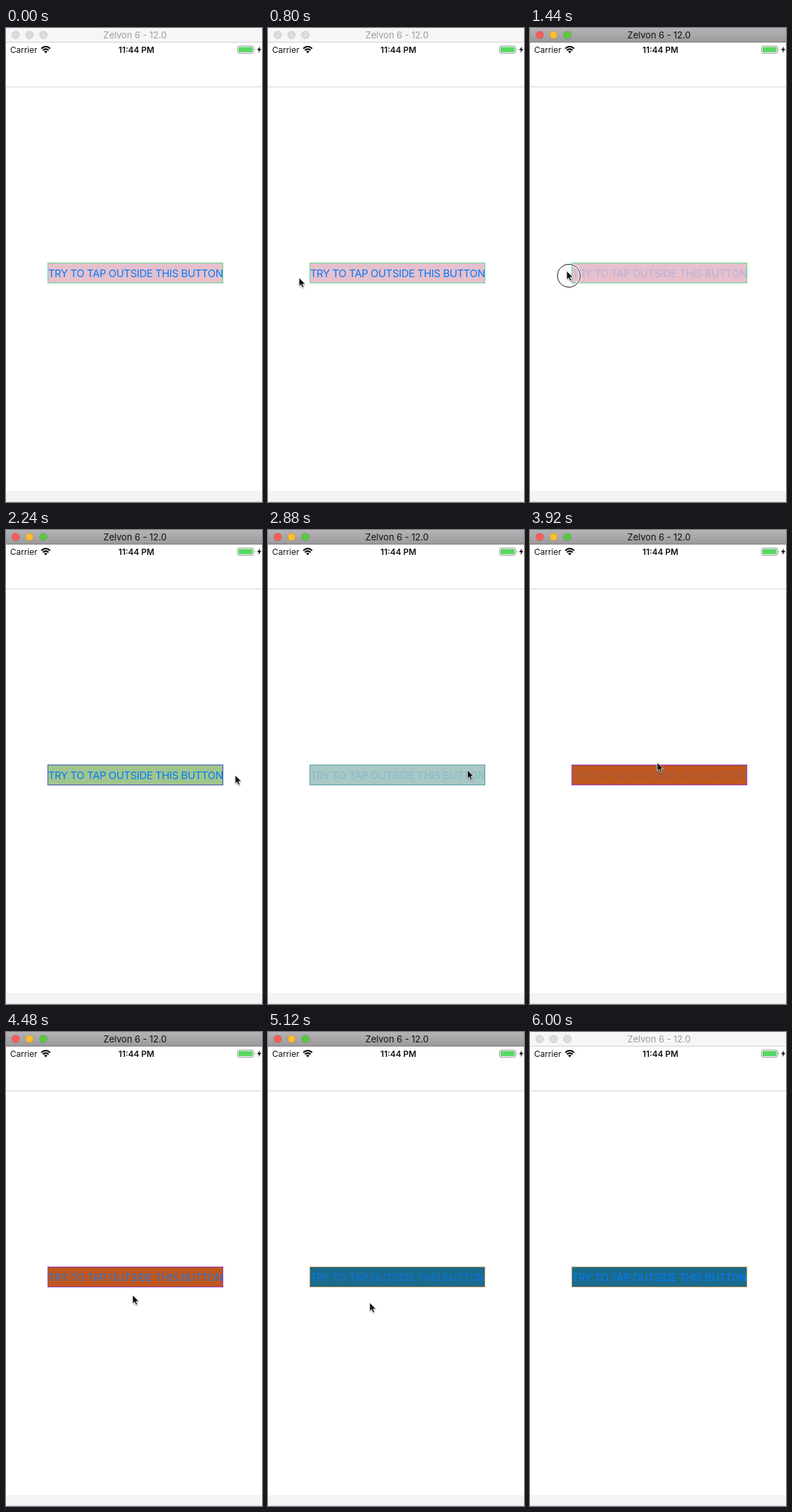
An HTML page that plays this animation: 370 px wide and 685 px high, repeating every 6.08 s.

```html
<!DOCTYPE html>
<html lang="en">
<head>
<meta charset="utf-8">
<title>Tap area demo</title>
<style>
  html, body { margin: 0; width: 100%; height: 100%; overflow: hidden; background: #fff; }
  svg { display: block; width: 370px; height: 685px; font-family: Inter, Roboto, sans-serif; }
  #label { font-size: 15px; letter-spacing: -.32px; }
</style>
</head>
<body>
<svg viewBox="0 0 370 685">
  <defs>
    <linearGradient id="steel" x1="0" y1="0" x2="0" y2="1">
      <stop offset="0" stop-color="#b5b3b5"/>
      <stop offset="1" stop-color="#9c9a9c"/>
    </linearGradient>
    <filter id="soft" x="-50%" y="-50%" width="200%" height="200%">
      <feGaussianBlur stdDeviation="1"/>
    </filter>
  </defs>
  <rect width="370" height="685" fill="#fff"/>

  <rect id="bar" width="370" height="20"/>
  <rect id="barLine" y="20" width="370" height="1"/>
  <g id="dots" stroke="#000" stroke-opacity=".12">
    <circle cx="14" cy="10" r="5.5"/>
    <circle cx="34" cy="10" r="5.5"/>
    <circle cx="54" cy="10" r="5.5"/>
  </g>
  <text id="title" x="186.5" y="15" font-size="13" text-anchor="middle">Zelvon 6 - 12.0</text>

  <text x="6" y="35.5" font-size="12" fill="#111">Carrier</text>
  <g fill="none" stroke="#000" stroke-width="2.1">
    <path d="M51 29.7Q57.4 23.8 63.8 29.7"/>
    <path d="M53.3 32.3Q57.4 28.6 61.5 32.3"/>
  </g>
  <path d="M55 33.9Q57.4 31.9 59.8 33.9L57.4 36.4Z"/>
  <text x="188.5" y="35.5" font-size="12" font-weight="600" text-anchor="middle" fill="#111">11:44 PM</text>
  <rect x="334.5" y="26" width="23.5" height="10.5" rx="2.5" fill="#fff" stroke="#999"/>
  <rect x="336" y="27.5" width="20.5" height="7.5" rx="1" fill="#58d763"/>
  <path d="M359.2 29.5Q361 31.2 359.2 33Z" fill="#999"/>
  <path d="M367.2 26.5L363 32H365.7L364.7 36L369 30.3H366.2Z"/>

  <rect y="84.5" width="370" height="1" fill="#d2d2d2"/>
  <rect y="669" width="370" height="16" fill="#f4f4f4"/>
  <rect y="684" width="370" height="1" fill="#dadada"/>

  <rect id="box" x="60.5" y="339.5" width="253" height="29"/>
  <text id="label" x="61" y="360">TRY TO TAP OUTSIDE THIS BUTTON</text>

  <g id="cursor">
    <g id="ring" fill="none">
      <circle cx="3.2" cy="7" r="16.5" stroke="#fff" stroke-width="3"/>
      <circle cx="3.2" cy="7" r="16.5" stroke="#111"/>
    </g>
    <path d="M0 1.5V14L3 11.3L5 16L7.3 15L5.3 10.5H9Z" opacity=".4" filter="url(#soft)"/>
    <path d="M0 0V12.6L2.8 10L4.7 14.5L7 13.5L5.1 9.2H9Z" fill="#111" stroke="#fff" stroke-width=".8"/>
  </g>
</svg>
<script>
const LOOP = 6080, STEP = 80, ENTER = 240, LEAVE = 5400, BLUR = 6000;
const DIM = 40, HOLD = 240, FADE = 240;
const $ = id => document.getElementById(id);
const set = (el, attrs) => { for (const k in attrs) el.setAttribute(k, attrs[k]); };
const clamp = v => Math.min(1, Math.max(0, v));
const easeOut = k => 1 - (1 - k) ** 1.8;

// Each move eases the pointer tip from where it rests to a new point.
const home = { x: 14, y: 398 };
const moves = [
  { from: ENTER, to: 1200, x: 53, y: 351 },
  { from: 1600, to: 2000, x: 344, y: 352 },
  { from: 2000, to: 2480, x: 326, y: 355 },
  { from: 2760, to: 3520, x: 184, y: 324 },
  { from: 3840, to: 4480, x: 183, y: 380 },
  { from: 4800, to: 5120, x: 147, y: 391 },
  { from: 5120, to: 5360, x: 3, y: 424 }
];
const presses = [1400, 2640, 3680, 4720];
const skins = [
  { fill: '#e6c0cc', stroke: '#5fdc8f' },
  { fill: '#a0c58e', stroke: '#3d4fae' },
  { fill: '#a9c8c4', stroke: '#58a0ae' },
  { fill: '#c0571f', stroke: '#9142cc', ink: '#2673d2' },
  { fill: '#1b6a8b', stroke: '#c6a468' }
];

function tip(t) {
  let { x, y } = home;
  for (const m of moves) {
    const k = easeOut(clamp((t - m.from) / (m.to - m.from)));
    x += (m.x - x) * k;
    y += (m.y - y) * k;
  }
  return [x, y];
}

function drawBar(active) {
  set($('bar'), { fill: active ? 'url(#steel)' : '#f6f6f6' });
  set($('barLine'), { fill: active ? '#7f7d7f' : '#d0d0d0' });
  set($('title'), { fill: active ? '#111' : '#9b9b9b' });
  const lights = ['#fc5b57', '#fdbc31', '#5ac940'];
  [...$('dots').children].forEach((d, i) => set(d, { fill: active ? lights[i] : '#dcdcdc' }));
}

function drawButton(count, age) {
  const held = age < HOLD;
  const { fill, stroke, ink = '#007aff' } = skins[held ? count - 1 : count];
  const opacity = age < DIM ? 1 : .2 + .8 * clamp((age - HOLD) / FADE);
  set($('box'), { fill, stroke });
  set($('label'), { fill: ink, opacity });
  set($('ring'), { opacity: held ? 1 : 0 });
}

function draw(t) {
  const count = presses.filter(p => p <= t).length;
  drawBar(count > 0 && t < BLUR);
  drawButton(count, count ? t - presses[count - 1] : Infinity);
  set($('cursor'), {
    visibility: t >= ENTER && t < LEAVE ? 'visible' : 'hidden',
    transform: `translate(${tip(t)})`
  });
}

const start = performance.now();
function tick() {
  const t = (performance.now() - start) % LOOP;
  draw(Math.floor(t / STEP) * STEP);
  requestAnimationFrame(tick);
}
tick();
</script>
</body>
</html>
```
